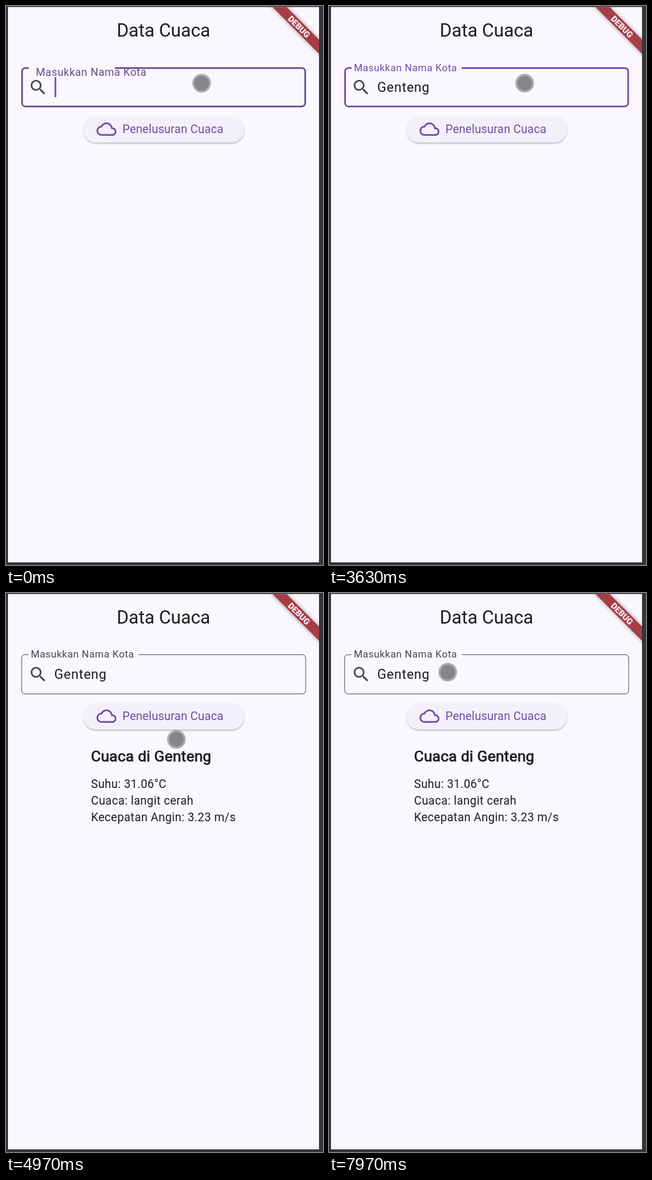
These frames come from a looping animation (478x840 px, 8 s). An HTML page:

```html
<!DOCTYPE html>
<html lang="id">
<head>
<meta charset="utf-8">
<title>Data Cuaca</title>
<style>
  html, body { margin: 0; width: 100%; height: 100%; overflow: hidden; background: #35343a; }
  svg { display: block; width: 100vw; height: 100vh; }
  text { font-family: Roboto, "Noto Sans", sans-serif; fill: #1d1b20; white-space: pre; }
  .body { font-size: 17.5px; letter-spacing: .31px; }
  .heading { font-size: 22.5px; letter-spacing: .31px; stroke: #1d1b20; stroke-width: .75px; }
</style>
</head>
<body>
<svg viewBox="0 0 478 840">
  <defs>
    <clipPath id="screen"><rect x="3" y="1.5" width="469" height="834.5"/></clipPath>
    <filter id="soft" x="-20%" y="-60%" width="140%" height="220%"><feGaussianBlur stdDeviation="1.3"/></filter>
    <filter id="glow" x="-20%" y="-100%" width="140%" height="300%"><feGaussianBlur stdDeviation="3.2"/></filter>
  </defs>
  <rect width="478" height="840" fill="#35343a"/>
  <g clip-path="url(#screen)">
    <rect width="478" height="840" fill="#fbf7fe"/>
    <text x="237.5" y="45.5" font-size="27.5" text-anchor="middle">Data Cuaca</text>

    <path id="border" fill="none"/>
    <text id="label">Masukkan Nama Kota</text>
    <path transform="translate(33.5 107.3) scale(1.251)" fill="#49454f" d="M15.5 14h-.79l-.28-.27C15.41 12.59 16 11.11 16 9.5 16 5.91 13.09 3 9.5 3S3 5.91 3 9.5 5.91 16 9.5 16c1.61 0 3.09-.59 4.23-1.57l.27.28v.79l5 4.99L20.49 19l-4.99-5zm-6 0C7.01 14 5 11.99 5 9.5S7.01 5 9.5 5 14 7.01 14 9.5 11.99 14 9.5 14z"/>
    <text id="city" x="72.8" y="128.5" font-size="20" letter-spacing=".63"></text>
    <rect id="caret" y="107" width="2.5" height="30" fill="#6750a4"/>

    <rect x="116.5" y="167" width="243" height="40" rx="20" fill="#8f8b98" opacity=".5" filter="url(#soft)"/>
    <rect x="116" y="165" width="243.5" height="40" rx="20" fill="#f4f0f9"/>
    <rect id="tint" x="116" y="165" width="243.5" height="40" rx="20" fill="#e3deea"/>
    <path transform="translate(136.5 170) scale(1.251)" fill="#6750a4" d="M12 6c2.62 0 4.88 1.86 5.39 4.43l.3 1.5 1.53.11c1.56.1 2.78 1.41 2.78 2.96 0 1.65-1.35 3-3 3H6c-2.21 0-4-1.79-4-4 0-2.05 1.53-3.76 3.56-3.97l1.07-.11.5-.95C8.08 7.14 9.94 6 12 6m0-2C9.11 4 6.6 5.64 5.35 8.04 2.34 8.36 0 10.91 0 14c0 3.31 2.69 6 6 6h13c2.76 0 5-2.24 5-5 0-2.64-2.05-4.78-4.65-4.96C18.67 6.59 15.64 4 12 4z"/>
    <text x="175.6" y="191" font-size="17.5" letter-spacing=".13" style="fill:#6750a4">Penelusuran Cuaca</text>

    <g id="result">
      <text class="heading" x="128.2" y="253">Cuaca di Genteng</text>
      <text class="body" x="128.2" y="293">Suhu: 31.06°C</text>
      <text class="body" x="128.2" y="318">Cuaca: langit cerah</text>
      <text class="body" x="128.2" y="343">Kecepatan Angin: 3.23 m/s</text>
    </g>

    <g transform="translate(472 1) rotate(45)">
      <rect x="-55" y="35" width="110" height="15" fill="#5c5862" opacity=".6" filter="url(#glow)"/>
      <rect x="-55" y="35" width="110" height="15" fill="#a63d47"/>
      <text y="47.1" font-size="12.76" font-weight="900" text-anchor="middle" style="fill:#fbf3f6">DEBUG</text>
    </g>

    <g id="dot">
      <circle r="14" fill="#5f5c62" opacity=".5"/>
      <circle id="core" r="11" fill="#75727a"/>
    </g>
    <path id="move" transform="translate(294 115)" fill="#111014" stroke="#fbf7fe" stroke-width="1" paint-order="stroke"
      d="M0-9.5L4.5-5H1.2V-1.2H5V-4.5L9.5 0 5 4.5V1.2H1.2V5H4.5L0 9.5-4.5 5H-1.2V1.2H-5V4.5L-9.5 0-5-4.5V-1.2H-1.2V-5H-4.5Z"/>
  </g>
</svg>
<script>
const LOOP = 8000;
const UNFOCUS = 4130;
const RESULT = 4600;
const GREY = [73, 69, 79];
const PURPLE = [103, 80, 164];
const el = id => document.getElementById(id);
const [border, label, city, caret, tint, result, dot, core, move] =
  ['border', 'label', 'city', 'caret', 'tint', 'result', 'dot', 'core', 'move'].map(el);

const mix = (a, b, k) => a + (b - a) * k;
const ramp = (t, a, b) => Math.min(1, Math.max(0, (t - a) / (b - a)));
const smooth = k => k * k * (3 - 2 * k);
const within = (t, a, b) => t >= a && t < b;
const show = (node, on) => node.setAttribute('visibility', on ? 'visible' : 'hidden');
const set = (node, attrs) => { for (const k in attrs) node.setAttribute(k, attrs[k]); };
const mixColor = (a, b, k) => `rgb(${a.map((v, i) => Math.round(mix(v, b[i], k)))})`;

// [time, typed text, caret x]
const typing = [
  [0, '', 73.2], [1330, 'G', 87.5], [2000, 'Ge', 98.8],
  [2370, 'Gente', 128.8], [2500, 'Genten', 140.5], [2600, 'Genteng', 152.2]
];
const caretOff = [[530, 900], [2830, 3770], [4000, LOOP]];

// [time, x, y]
const path = [
  [0, 295, 116], [3740, 295, 116], [3800, 260, 188], [4700, 260, 188],
  [4970, 257, 220], [5400, 330, 366], [5640, 367, 357], [5730, 369, 359],
  [5970, 369, 359], [6100, 330, 376], [6840, 330, 376], [7000, 306, 385],
  [7300, 306, 385], [7970, 179, 119], [LOOP, 179, 119]
];

function pointerAt(t) {
  const i = Math.max(1, path.findIndex(p => p[0] > t));
  const [a, b] = [path[i - 1], path[i]];
  const k = smooth(ramp(t, a[0], b[0]));
  return [mix(a[1], b[1], k), mix(a[2], b[2], k)];
}

function drawField(t) {
  const focused = t < UNFOCUS;
  const rise = mix(.78, 1, 1 - (1 - ramp(t, 0, 110)) ** 2);
  const tone = mix(.75, 1, ramp(t, 0, 120));
  const inset = focused ? 1.25 : .6;
  const [l, r, top, bottom] = [23 + inset, 452.4 - inset, 92 + inset, 152.2 - inset];
  const arc = (x, y) => `A5 5 0 0 1 ${x} ${y}`;
  set(border, {
    d: `M${34 + 166 * rise} ${top}H${r - 5}${arc(r, top + 5)}V${bottom - 5}${arc(r - 5, bottom)}` +
       `H${l + 5}${arc(l, bottom - 5)}V${top + 5}${arc(l + 5, top)}H34`,
    stroke: focused ? mixColor(GREY, PURPLE, tone) : '#79747e',
    'stroke-width': focused ? 2.5 : 1.2
  });
  set(label, {
    x: mix(73, 37.4, rise),
    y: mix(128.5, focused ? 98 : 97.4, rise),
    'font-size': mix(20, 15, rise),
    'letter-spacing': mix(.63, .47, rise)
  });
  label.style.fill = mixColor(GREY, PURPLE, focused ? tone : 0);

  const [, text, x] = typing.filter(s => t >= s[0]).pop();
  if (city.textContent !== text) city.textContent = text;
  set(caret, { x });
  show(caret, !caretOff.some(([a, b]) => within(t, a, b)));
}

function render(t) {
  drawField(t);
  set(tint, { opacity: ramp(t, 4000, 4130) * (1 - ramp(t, 4800, 4930)) });
  show(result, t >= RESULT);

  const [x, y] = pointerAt(t);
  const moving = within(t, 960, 2000);
  set(dot, { transform: `translate(${x} ${y})` });
  set(core, { opacity: within(t, 4000, 4400) ? .72 : .66 });
  show(dot, !moving);
  show(move, moving);
}

const start = performance.now();
function tick() {
  render((performance.now() - start) % LOOP);
  requestAnimationFrame(tick);
}
tick();
</script>
</body>
</html>
```
